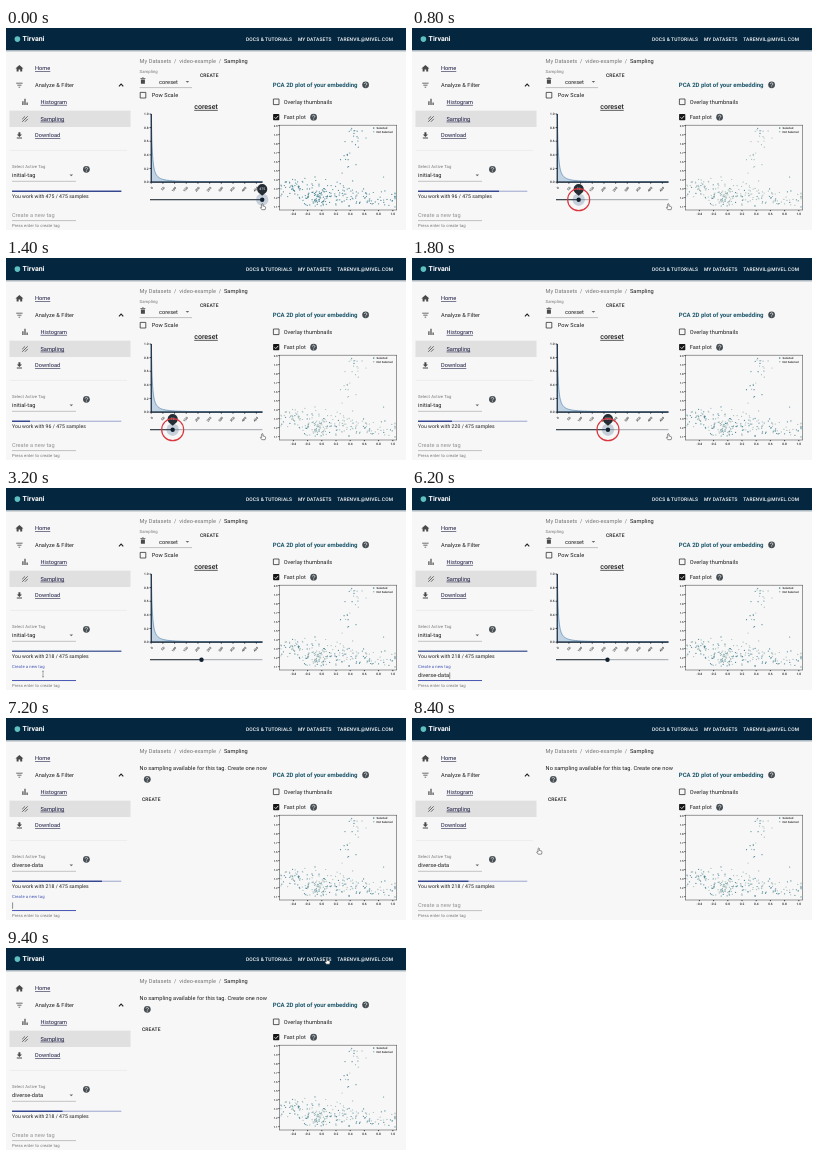
An HTML page for the animation above (9.6 s loop, 400 by 202 pixels).

```html
<!DOCTYPE html>
<html lang="en">
<head>
<meta charset="utf-8">
<title>Sampling dashboard</title>
<style>
  html, body { margin: 0; width: 100%; height: 100%; overflow: hidden; background: #f7f7f7; }
  svg { display: block; width: 100vw; height: 100vh; }
  text { font-family: Roboto, "Liberation Sans", sans-serif; font-size: 5.6px; letter-spacing: .009em;
    fill: #1d1d1f; text-rendering: geometricPrecision; white-space: pre; }
  .btn { font-size: 4.9px; font-weight: 500; letter-spacing: .0286em; }
  .nav { fill: #fff; }
  .brand { font-size: 7px; font-weight: 700; letter-spacing: 0; fill: #fff; }
  .cap { font-size: 4.2px; letter-spacing: .02em; fill: #757575; }
  .count { font-size: 5.1px; }
  .grey { fill: #757575; }
  .hint { fill: #929292; }
  .link { text-decoration: underline; fill: #16163f; }
  .title { font-size: 7px; font-weight: 500; letter-spacing: 0; text-decoration: underline; text-anchor: middle; }
  .head { font-size: 6px; font-weight: 700; fill: #1c566b; letter-spacing: 0; }
  .tick { font-size: 3.2px; font-weight: 500; letter-spacing: 0; }
  .tiny { font-size: 2.8px; font-weight: 500; letter-spacing: 0; }
  .bub { font-size: 3.5px; letter-spacing: 0; fill: #fff; text-anchor: middle; }
  .icon { fill: #4a4a4a; }
  .line { fill: none; stroke: #4a4a4a; stroke-width: .8; }
  .box { fill: none; stroke: #333; stroke-width: .8; }
  .rule { stroke: #8b8b8b; stroke-width: .5; }
  .axis { fill: none; stroke: #13202e; stroke-width: .8; }
  .dot { fill: #9fb9b6; }
  .dot.on { fill: #4d8795; }
</style>
</head>
<body>
<svg viewBox="0 0 400 202" preserveAspectRatio="none">
  <defs>
    <linearGradient id="shade" x2="0" y2="1">
      <stop stop-color="#04263f" stop-opacity=".4"/>
      <stop offset="1" stop-color="#04263f" stop-opacity="0"/>
    </linearGradient>
    <g id="help">
      <circle r="3.4" fill="#474e53"/>
      <path d="M-1.2-.8a1.2 1.2 0 1 1 1.9 1Q0 .6 0 1.1M0 1.7v.7" fill="none" stroke="#f7f7f7" stroke-width=".7"/>
    </g>
    <path id="down" d="M-1.8-.9h3.6L0 .9z" fill="#666"/>
    <path id="square" d="M-2.8-2.8h5.6v5.6h-5.6z" class="box"/>
  </defs>

  <rect width="400" height="202" fill="#f7f7f7"/>
  <rect y="22" width="400" height="2.4" fill="url(#shade)"/>
  <rect width="400" height="22" fill="#04263f"/>
  <circle cx="11.4" cy="11.1" r="2.8" fill="#5fc0c0"/>
  <text class="brand" x="16.6" y="13.4">Tirvani</text>
  <text class="btn nav" x="240" y="12.8">DOCS &amp; TUTORIALS</text>
  <text class="btn nav" x="292" y="12.8">MY DATASETS</text>
  <text class="btn nav" x="331.3" y="12.8">TARENVIL@MIVEL.COM</text>

  <!-- sidebar -->
  <rect x="3.5" y="82.6" width="121" height="16.4" fill="#e0e0e0"/>
  <g class="icon">
    <path d="M13.4 36.9l4 3.6h-1.2v3.1h-2v-2.2h-1.6v2.2h-2v-3.1H9.4z"/>
    <path class="line" d="M10.2 55.2h6.4M11.3 57.2h4.2M12.6 59.2h1.6"/>
    <path d="M16.3 73.3h1.2v3.6h-1.2zM18.4 70.8h1.2v6.1h-1.2zM20.5 74.4h1.2v2.5h-1.2z"/>
    <path class="line" d="M16.2 91.2l2.9-2.9M16.2 93.8l5.5-5.5M18.9 93.8l2.9-2.9"/>
    <path d="M12.4 104.2h2v2.2h1.6l-2.6 2.5-2.6-2.5h1.6zM10.8 109.6h5.2v.9h-5.2z"/>
  </g>
  <text class="link" x="29" y="42.2">Home</text>
  <text x="29" y="59">Analyze &amp; Filter</text>
  <path d="M112.9 58.3l2.2-2.2 2.2 2.2" fill="none" stroke="#222" stroke-width="1.1"/>
  <text class="link" x="34.5" y="75.9">Histogram</text>
  <text class="link" x="34.5" y="92.7">Sampling</text>
  <text class="link" x="29" y="109.2">Download</text>
  <path d="M4 122.4H121" stroke="#dedede" stroke-width=".5"/>

  <text class="cap" x="6" y="140">Select Active Tag</text>
  <text id="tag" x="6" y="149.1"></text>
  <use href="#down" x="65.3" y="147.4"/>
  <path class="rule" d="M6 153.3H70"/>
  <use href="#help" x="80.4" y="141.3"/>
  <rect x="6" y="162.6" width="109.3" height="1.4" fill="#b4bcda"/>
  <rect id="bar" x="6" y="162.6" height="1.4" fill="#35478f"/>
  <text id="count" class="count" x="6" y="169.6"></text>

  <text id="holder" class="hint" x="6" y="189.4">Create a new tag</text>
  <path class="rule" d="M6 192.6H70"/>
  <g id="focus">
    <text class="cap" x="6" y="180.4" style="fill:#3f51b5">Create a new tag</text>
    <path d="M6 192.5H70" stroke="#3f51b5" stroke-width=".9"/>
  </g>
  <text id="typed" x="6" y="189.4"></text>
  <path id="caret" d="M.6 184.4v6.4" stroke="#222" stroke-width=".5"/>
  <text class="cap" x="6" y="198.9">Press enter to create tag</text>

  <!-- sampling panel -->
  <text class="grey" x="133.6" y="35.4">My Datasets</text>
  <text class="grey" x="168" y="35.4">/</text>
  <text class="grey" x="173.3" y="35.4">video-example</text>
  <text class="grey" x="212.8" y="35.4">/</text>
  <text x="218" y="35.4">Sampling</text>

  <g id="panel">
    <text class="cap" x="133.6" y="45.3">Sampling</text>
    <path class="icon" d="M134.9 51.4h4v4.4h-4zM134.4 50h1.5l.4-.5h1.2l.4.5h1.5v.8h-5z"/>
    <text x="153" y="55.7">coreset</text>
    <use href="#down" x="181.4" y="53.8"/>
    <path class="rule" d="M133.6 59.6H186"/>
    <text class="btn" x="194" y="49.2">CREATE</text>
    <use href="#square" x="137" y="67.2"/>
    <text x="145.8" y="69.2">Pow Scale</text>
    <text class="title" x="200" y="80.9">coreset</text>
    <path id="curve" fill="#4682b4" fill-opacity=".3" stroke="#3f78aa" stroke-width=".6"/>
    <path class="axis" d="M145.2 86V154.1H256.5" style="stroke-width:1.1"/>
    <g id="chartTicks"></g>
    <path d="M144 171.7H256.4" stroke="#8a8f93" stroke-width=".8"/>
    <path id="fill" stroke="#1d2730" stroke-width=".9"/>
    <g id="knob">
      <circle id="halo" r="6.2" fill="#1f4a78" fill-opacity=".22"/>
      <circle r="2.2" fill="#10202e"/>
      <g id="bubble">
        <path d="M0-3.9L-3.8-7.2A5.1 5.1 0 1 1 3.8-7.2Z" fill="#252d35"/>
        <text id="value" class="bub" y="-9.5"></text>
      </g>
      <circle id="ring" r="11" fill="none" stroke="#d9363e" stroke-width="1.2"/>
    </g>
  </g>

  <g id="empty">
    <text x="133.6" y="52.3">No sampling available for this tag. Create one now</text>
    <use href="#help" x="141.3" y="61.3"/>
    <text class="btn" x="136" y="82.8">CREATE</text>
  </g>

  <!-- embedding plot -->
  <text class="head" x="266.8" y="58.5">PCA 2D plot of your embedding</text>
  <use href="#help" x="359.6" y="56.8"/>
  <use href="#square" x="270.2" y="73.8"/>
  <text x="277.7" y="75.8">Overlay thumbnails</text>
  <rect x="267.1" y="86.1" width="6.2" height="6.2" rx=".7" fill="#161616"/>
  <path d="M268.5 89.3l1.3 1.3 2.4-2.7" fill="none" stroke="#fff" stroke-width=".8"/>
  <text x="277.7" y="91.3">Fast plot</text>
  <use href="#help" x="307.6" y="89.2"/>
  <rect x="273.5" y="97.2" width="117.2" height="84.8" fill="none" stroke="#555" stroke-width=".6"/>
  <g id="plotTicks"></g>
  <g id="dots"></g>
  <circle class="dot on" cx="367.7" cy="100.1" r=".8"/>
  <circle class="dot" cx="367.7" cy="103.7" r=".8"/>
  <text class="tiny" x="370.5" y="101.1">Selected</text>
  <text class="tiny" x="370.5" y="104.7">Not Selected</text>

  <g id="pointer">
    <path id="hand" d="M-.8 0q.8-.9 1.3 0v2l2 .5q.8.3.6 1.2l-.5 2H-.7L-2.2 3.5q.3-.8 1.4 0z"
      fill="#fff" stroke="#222" stroke-width=".5"/>
    <path id="beam" d="M-1-2.8h2M0-2.8v5.6M-1 2.8h2" stroke="#555" stroke-width=".5"/>
  </g>
</svg>

<script>
const LOOP = 9600, STEP = 200, TOTAL = 475;
const $ = id => document.getElementById(id);

function add(parent, name, attrs, label) {
  const el = document.createElementNS('http://www.w3.org/2000/svg', name);
  for (const key in attrs) el.setAttribute(key, attrs[key]);
  if (label !== undefined) el.textContent = label;
  return parent.appendChild(el);
}

function random(seed) {
  return () => (seed = (seed * 16807) % 2147483647) / 2147483647;
}

function buildChart() {
  let d = 'M145.4 154V86';
  for (let x = .25; x <= 111; x += x < 12 ? .25 : 3)
    d += `L${145.4 + x} ${154 - 68 * Math.pow(1 + .8 * x, -1.4)}`;
  $('curve').setAttribute('d', d + 'L256.4 154Z');
  const ticks = $('chartTicks');
  for (let i = 0; i <= 5; i++) {
    const y = 154.1 - i * 13.62;
    add(ticks, 'path', { class: 'axis', d: `M143.6 ${y}h1.6` });
    add(ticks, 'text', { class: 'tick', x: 142.6, y: y + 1.1, 'text-anchor': 'end' }, (i / 5).toFixed(1));
  }
  for (let n = 0; n <= 450; n += 50) {
    const x = 145.2 + n * .2337;
    add(ticks, 'path', { class: 'axis', d: `M${x} 154.1v1.6` });
    add(ticks, 'text', { class: 'tick', 'text-anchor': 'end',
      transform: `translate(${x + 2} 160) rotate(-48)` }, n);
  }
}

function buildPlot() {
  const ticks = $('plotTicks');
  for (let i = 0; i < 10; i++) {
    const y = 97.6 + i * 9;
    add(ticks, 'path', { class: 'axis', d: `M272.3 ${y}h1.2` });
    add(ticks, 'text', { class: 'tiny', x: 271.6, y: y + 1, 'text-anchor': 'end' }, (2 - i / 10).toFixed(1));
  }
  for (let i = 0; i < 8; i++) {
    const x = 287.4 + i * 14.2;
    add(ticks, 'path', { class: 'axis', d: `M${x} 182v1.2` });
    add(ticks, 'text', { class: 'tick', x, y: 187, 'text-anchor': 'middle' }, (i / 5 - .4).toFixed(1));
  }

  const rnd = random(4217);
  const bell = () => (rnd() + rnd() + rnd() - 1.5) * 2;
  const dot = (x, y) => add($('dots'), 'circle', {
    class: 'dot', r: .6,
    cx: Math.max(275, Math.min(389, x)).toFixed(1),
    cy: (y > 179 ? 176 + rnd() * 4 : y).toFixed(1)
  });
  const cloud = (n, x, y, sx, sy) => { while (n--) dot(x + bell() * sx, y + bell() * sy); };
  cloud(90, 312, 165, 14, 6);
  cloud(28, 312, 172, 3, 3);
  cloud(45, 287, 159, 9, 4.5);
  cloud(30, 342, 167, 10, 6);
  cloud(50, 370, 171, 12, 4.5);
  for (let i = 0; i < 18; i++) {
    const k = rnd();
    dot(331 + 20 * k + bell() * 5, 148 - 42 * k + bell() * 3);
  }
  cloud(6, 348, 103, 5, 2);
  cloud(6, 352, 139, 14, 9);
}

// Linear interpolation through [time, value] pairs.
function track(keys, t) {
  const i = keys.findIndex(k => k[0] > t);
  if (i < 0) return keys[keys.length - 1][1];
  if (i === 0) return keys[0][1];
  const [t0, a] = keys[i - 1], [t1, b] = keys[i];
  return a + (b - a) * (t - t0) / (t1 - t0);
}

const ease = p => p * p * (3 - 2 * p);
const progress = (t, from, to) => ease(Math.max(0, Math.min(1, (t - from) / (to - from))));

const amount = [[0, 475], [200, 475], [600, 250], [800, 96], [1000, 70], [1200, 70], [1400, 96],
  [1800, 220], [2000, 236], [2200, 222], [2400, 218]];
const barEnd = [[0, 115.3], [400, 115.3], [800, 87], [1200, 26], [1400, 24], [1600, 29], [1800, 40],
  [2200, 58], [2400, 56.5], [2600, 56.5], [3000, 115.3], [7000, 115.3], [7200, 96], [7600, 56.5]];
const typing = [[3800, 'd'], [4000, 'dive'], [4200, 'diverse'], [4400, 'diverse-t'], [5000, 'diverse-'],
  [5400, 'diverse-d'], [5600, 'diverse-da'], [6000, 'diverse-dat'], [6200, 'diverse-data'], [6800, '']];

const show = (id, on) => $(id).setAttribute('visibility', on ? 'inherit' : 'hidden');

function render(t) {
  const n = Math.round(track(amount, t)), x = 144 + 112.2 * n / TOTAL;
  const created = t >= 6800, focused = t >= 3000 && t < 8200;
  const dragging = t >= 400 && t < 2400;

  $('knob').setAttribute('transform', `translate(${x} 171.7)`);
  $('fill').setAttribute('d', `M144 171.7H${x}`);
  $('value').textContent = n;
  show('bubble', t < 2400);
  show('halo', t < 2400);
  show('ring', dragging);
  show('panel', !created);
  show('empty', created);

  $('bar').setAttribute('width', track(barEnd, t) - 6);
  $('bar').setAttribute('fill', t >= 2600 && t < 6800 ? '#5a6b9f' : '#35478f');
  $('count').textContent = `You work with ${n} / ${TOTAL} samples`;
  $('tag').textContent = created ? 'diverse-data' : 'initial-tag';

  const entry = typing.filter(k => k[0] <= t).pop();
  const word = entry ? entry[1] : '';
  $('typed').textContent = word;
  const width = word ? $('typed').getComputedTextLength() : 0;
  $('caret').setAttribute('transform', `translate(${6 + width} 0)`);
  show('caret', focused && t >= 3600);
  show('focus', focused);
  show('holder', !focused);

  dots.forEach((d, i) => d.classList.toggle('on', order[i] < n / TOTAL));

  const toField = progress(t, 2400, 3000), toMenu = progress(t, 7800, 9400);
  const px = 256.5 - 219.5 * toField + 284 * toMenu;
  const py = 176 + 10 * toField - 175.5 * toMenu;
  $('pointer').setAttribute('transform', `translate(${px} ${py})`);
  show('pointer', t < 3800 || t >= 8000);
  show('beam', t >= 3000 && t < 3800);
  show('hand', t < 3000 || t >= 8000);
}

buildChart();
buildPlot();
const dots = [...$('dots').children];
const pick = random(991);
const order = dots.map(pick);

let last = -1;
function tick(now) {
  const t = Math.floor((now % LOOP) / STEP) * STEP;
  if (t !== last) render(last = t);
  requestAnimationFrame(tick);
}
render(0);
requestAnimationFrame(tick);
</script>
</body>
</html>
```
